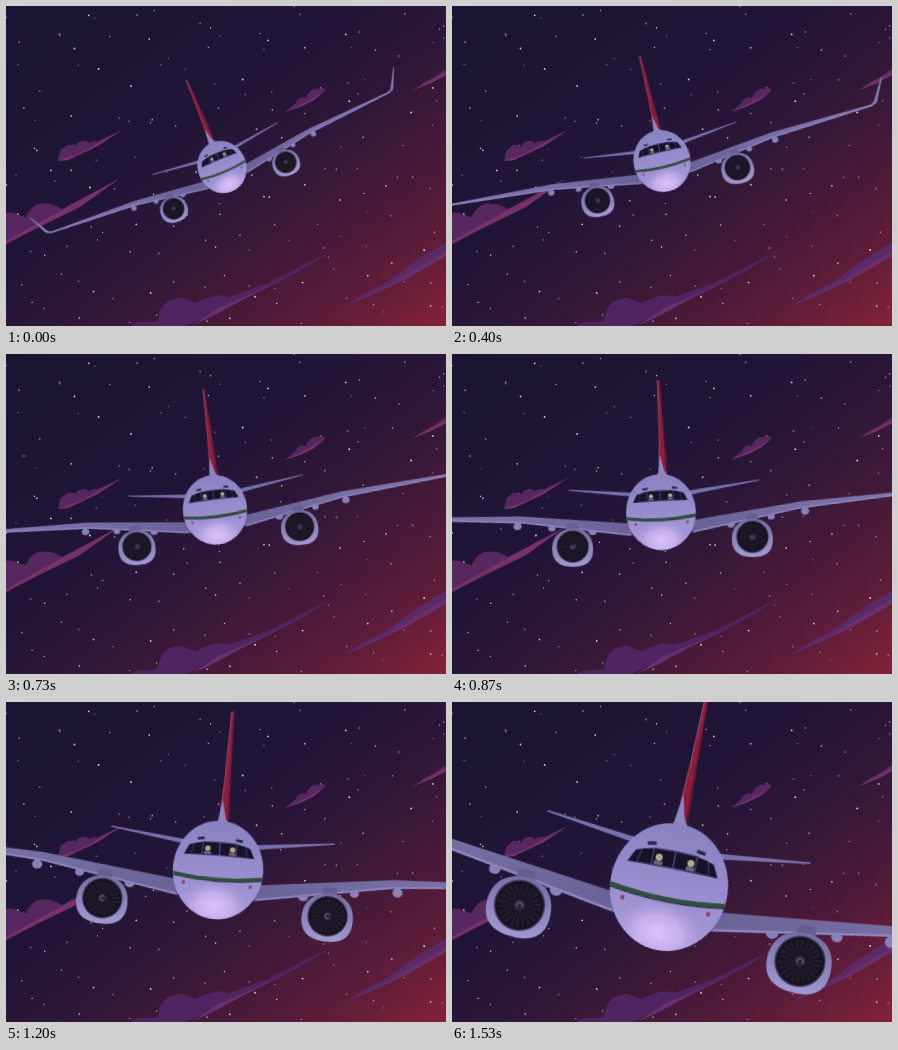
Recreate the animation shown at these times as an HTML page. Size 440 by 320 pixels, loop 1590 ms.

```html
<!DOCTYPE html>
<html lang="en">
<head>
<meta charset="utf-8">
<title>Night flight</title>
<style>
  html, body { margin: 0; width: 100%; height: 100%; overflow: hidden; background: #1a1433; }
  svg { display: block; width: 100vw; height: 100vh; }

  #plane, #tail, #body { animation: 1590ms infinite; }
  #plane { animation-name: approach; }
  #tail { animation-name: recede; }
  #body { animation-name: swell; }
  .fan { animation: spin 1590ms steps(24) infinite; }

  /* 100 plane units = distance from the centreline to an engine */
  @keyframes approach {
    0% { transform: translate(216px, 161px) rotate(-22.5deg) scale(.607); animation-timing-function: steps(6); }
    25.09% { transform: translate(210px, 155px) rotate(-13.3deg) scale(.719); animation-timing-function: steps(3); }
    37.67% { transform: translate(209px, 155px) rotate(-8.3deg) scale(.793); animation-timing-function: steps(4); }
    54.65% { transform: translate(209px, 158px) rotate(-3.1deg) scale(.9); animation-timing-function: steps(5); }
    75.41% { transform: translate(212px, 168px) rotate(4.6deg) scale(1.13); animation-timing-function: steps(3); }
    87.99% { transform: translate(216px, 179px) rotate(9.2deg) scale(1.34); animation-timing-function: steps(2); }
    96.16%, 100% { transform: translate(217px, 185px) rotate(11.3deg) scale(1.43); }
  }
  @keyframes recede {
    0% { transform: translate(1px, -32px) scale(1); animation-timing-function: steps(6); }
    25.09% { transform: translate(4px, -29px) scale(.98); animation-timing-function: steps(3); }
    37.67% { transform: translate(4px, -29px) scale(.965); animation-timing-function: steps(4); }
    54.65% { transform: translate(5px, -29.5px) scale(.95); animation-timing-function: steps(5); }
    75.41% { transform: translate(2px, -31px) scale(.89); animation-timing-function: steps(3); }
    87.99% { transform: translate(.5px, -33.5px) scale(.845); animation-timing-function: steps(2); }
    96.16%, 100% { transform: translate(0, -35.5px) scale(.84); }
  }
  @keyframes swell {
    0% { transform: scale(1); animation-timing-function: steps(6); }
    25.09% { transform: scale(.99); animation-timing-function: steps(7); }
    54.65% { transform: scale(.97); animation-timing-function: steps(5); }
    75.41% { transform: scale(1); animation-timing-function: steps(5); }
    96.16%, 100% { transform: scale(1.03); }
  }
  @keyframes spin { to { transform: rotate(1080deg); } }
</style>
</head>
<body>
<svg viewBox="0 0 440 320" preserveAspectRatio="none">
  <defs>
    <linearGradient id="sky" gradientUnits="userSpaceOnUse" x1="0" y1="0" x2="312" y2="416">
      <stop offset="0" stop-color="#1a1432"/>
      <stop offset=".4" stop-color="#211537"/>
      <stop offset=".56" stop-color="#2e1738"/>
      <stop offset=".74" stop-color="#491a38"/>
      <stop offset=".87" stop-color="#621d38"/>
      <stop offset="1" stop-color="#842238"/>
    </linearGradient>
    <linearGradient id="skin" x1="0" y1="0" x2="0" y2="1">
      <stop offset="0" stop-color="#8981bf"/>
      <stop offset=".5" stop-color="#978dce"/>
      <stop offset="1" stop-color="#aa9ad9"/>
    </linearGradient>
    <radialGradient id="glow">
      <stop offset="0" stop-color="#dcc2fa"/>
      <stop offset=".5" stop-color="#cdb6f2" stop-opacity=".8"/>
      <stop offset="1" stop-color="#aa9ad9" stop-opacity="0"/>
    </radialGradient>
    <linearGradient id="metal" gradientUnits="userSpaceOnUse" x1="34" y1="0" x2="303" y2="0">
      <stop offset="0" stop-color="#6a6296"/>
      <stop offset=".4" stop-color="#756da2"/>
      <stop offset="1" stop-color="#7f77ae"/>
    </linearGradient>
    <linearGradient id="cowl" x1="0" y1="0" x2="0" y2="1">
      <stop offset="0" stop-color="#756da3"/>
      <stop offset="1" stop-color="#a399d2"/>
    </linearGradient>
    <clipPath id="hull"><ellipse rx="40" ry="43.5"/></clipPath>

    <g id="wing">
      <g fill="#8a81bb">
        <ellipse cx="77" cy="17.5" rx="4.5" ry="4"/>
        <ellipse cx="122" cy="11.5" rx="4" ry="3.5"/>
        <ellipse cx="160" cy="7.5" rx="4.5" ry="4"/>
      </g>
      <path fill="url(#metal)" d="M28 12 L39 10.5 L156 -3.5 L299 -9.5 Q305 -10 307 -15 L323.5 -44 L325 -44 L311 -13 Q309 -8.5 303 -7.7 L245 -3 L156 4 L34 25 Z"/>
      <path fill="none" stroke="#8f86c1" stroke-width="1.6" d="M36 23.5 L156 3.4 L245 -3.4 L303 -8"/>
    </g>

    <g id="engine" transform="translate(100 33.5)">
      <path fill="#665e8f" d="M-7 -18 L-5 -26 H6 L8 -18 Z"/>
      <path fill="url(#cowl)" d="M0 -20.5 C14 -20.5 22.5 -12 22.5 2 C22.5 16 15 22 2 22 C-14 22 -23 16 -23 2 C-23 -12 -14 -20.5 0 -20.5 Z"/>
      <g transform="translate(0 -.5)">
        <circle r="18" fill="#453d61"/>
        <circle r="17" fill="#17121f"/>
        <g class="fan">
          <circle r="10" fill="none" stroke="#272136" stroke-width="10" stroke-dasharray=".9 1.956"/>
          <circle r="4" fill="#2a2439"/>
          <path d="M-1.8 1.2 A2.2 2.2 0 1 1 1.8 1.3" fill="none" stroke="#7d7595" stroke-width=".8"/>
        </g>
      </g>
    </g>

    <path id="stab" fill="#7870ac" d="M0 11 L36 7 L111 -.8 L112 .4 L40 11 L0 19 Z"/>

    <g id="panes">
      <path fill="#3f3866" d="M0 -25 L14 -24.5 L27 -21 L31.5 -12 L0 -12.5 Z"/>
      <path fill="#17122a" d="M.7 -24 L14.2 -23.5 L14.7 -13.5 L.7 -13.5 Z M15.4 -23.3 L22.3 -22.3 L24.4 -13 L15.8 -13.4 Z M23.3 -21.8 L27 -20 L30.5 -12.5 L25.2 -12.8 Z"/>
      <path stroke="#2c2547" stroke-width="2.4" d="M14 -27.5 L20 -26.5"/>
      <rect x="28.5" y="11.5" width="2.4" height="2.8" fill="#8b3a5c"/>
    </g>
  </defs>

  <rect width="440" height="320" fill="url(#sky)"/>
  <g id="stars"></g>

  <g fill="#56285f">
    <path d="M52 155 C54 148 53 143 58 142 C60 138 66 138 69 141 C70 135 80 133 83 137 C88 134 91 136 94 134 L116 124 L90 140 L62 154 Z"/>
    <path d="M0 207 C8 205 12 210 20 211 C24 202 30 196 40 198 C48 197 52 202 56 203 L113 173 L70 203 L30 222 L0 238 Z"/>
    <path d="M279 106 L290 97 C291 91 298 91 300 92 C302 86 307 82 312 83 C316 81 320 82 319 85 L308 94 L296 100 Z"/>
    <path d="M407 84 L420 75 C424 74 428 71 431 69 L440 63 V69 L425 77 Z"/>
    <path fill="#4e2560" d="M125 320 C130 314 140 317 152 315 C153 302 160 293 170 293 C176 289 182 296 190 297 C200 291 215 287 222 291 L262 277 L330 243 L290 267 L250 287 L205 308 L180 320 Z"/>
    <path fill="#5a2a66" d="M340 300 C352 292 360 286 378 278 C400 263 415 250 440 237 V250 L400 273 L370 287 Z"/>
  </g>
  <g fill="#763268">
    <path d="M52 155 L74 147 L116 124 L92 140 L62 154 Z"/>
    <path d="M0 235 L34 216 L113 173 L74 201 L35 220 L0 238 Z"/>
    <path d="M279 106 L300 96 L318 86 L308 94 L296 100 Z"/>
    <path d="M407 84 L440 66 V69 L425 77 Z"/>
    <path fill="#672f6c" d="M185 320 L212 302 L245 288 L285 270 L240 292 L205 311 Z"/>
    <path fill="#6a2f6a" d="M340 300 L378 282 L440 245 V250 L400 273 L370 287 Z"/>
  </g>

  <g id="plane">
    <g id="tail">
      <use href="#stab"/>
      <use href="#stab" transform="scale(-1 1)"/>
      <path fill="#8f1c3a" d="M-1.2 -123.5 L1.2 -123.5 L3.5 -50 L5 -10 L-5 -10 L-2.5 -60 Z"/>
      <path fill="#5d1833" d="M.8 -123.5 L1.2 -123.5 L3.5 -50 L5 -10 L3 -10 Z"/>
      <path fill="none" stroke="#a2587e" stroke-width=".8" d="M-1.2 -123 L-2.5 -60 L-4.6 -18"/>
      <path fill="#8e84c0" d="M-3.2 -36 L1 -18 L6 -8 L-7 -8 Z"/>
    </g>
    <use href="#wing"/>
    <use href="#wing" transform="scale(-1 1)"/>
    <use href="#engine"/>
    <use href="#engine" x="-200"/>
    <g id="body">
      <ellipse rx="40" ry="43.5" fill="url(#skin)"/>
      <g clip-path="url(#hull)">
        <ellipse cx="-1" cy="32" rx="32" ry="23" fill="url(#glow)"/>
        <path d="M-42 5 Q0 12 42 5" fill="none" stroke="#30523a" stroke-width="3.2"/>
        <path d="M-42 6.8 Q0 13.8 42 6.8" fill="none" stroke="#272341" stroke-width=".7"/>
      </g>
      <use href="#panes"/>
      <use href="#panes" transform="scale(-1 1)"/>
      <g fill="#b5a98a">
        <circle cx="-10.5" cy="-18.5" r="2.4"/>
        <circle cx="11.5" cy="-18.5" r="2.4"/>
      </g>
      <g fill="#6d6685">
        <rect x="-13.5" y="-16" width="6" height="2.5"/>
        <rect x="8.5" y="-16" width="6" height="2.5"/>
      </g>
    </g>
  </g>
</svg>
<script>
  // One star per cell of a loose grid, placed by a seeded generator.
  let seed = 41;
  const rand = () => (seed = (seed * 16807) % 2147483647) / 2147483647;
  const tints = ['#d9c6bd', '#b39da6', '#84708c'];
  const cell = 29;
  let dots = '';
  for (let y = 0; y < 320; y += cell) {
    for (let x = 0; x < 440; x += cell) {
      const cx = (x + rand() * cell).toFixed(1);
      const cy = (y + rand() * cell).toFixed(1);
      const r = (0.6 + rand() * 0.4).toFixed(2);
      dots += `<circle cx="${cx}" cy="${cy}" r="${r}" fill="${tints[Math.floor(rand() * 3)]}"/>`;
    }
  }
  document.getElementById('stars').innerHTML = dots;
</script>
</body>
</html>
```
